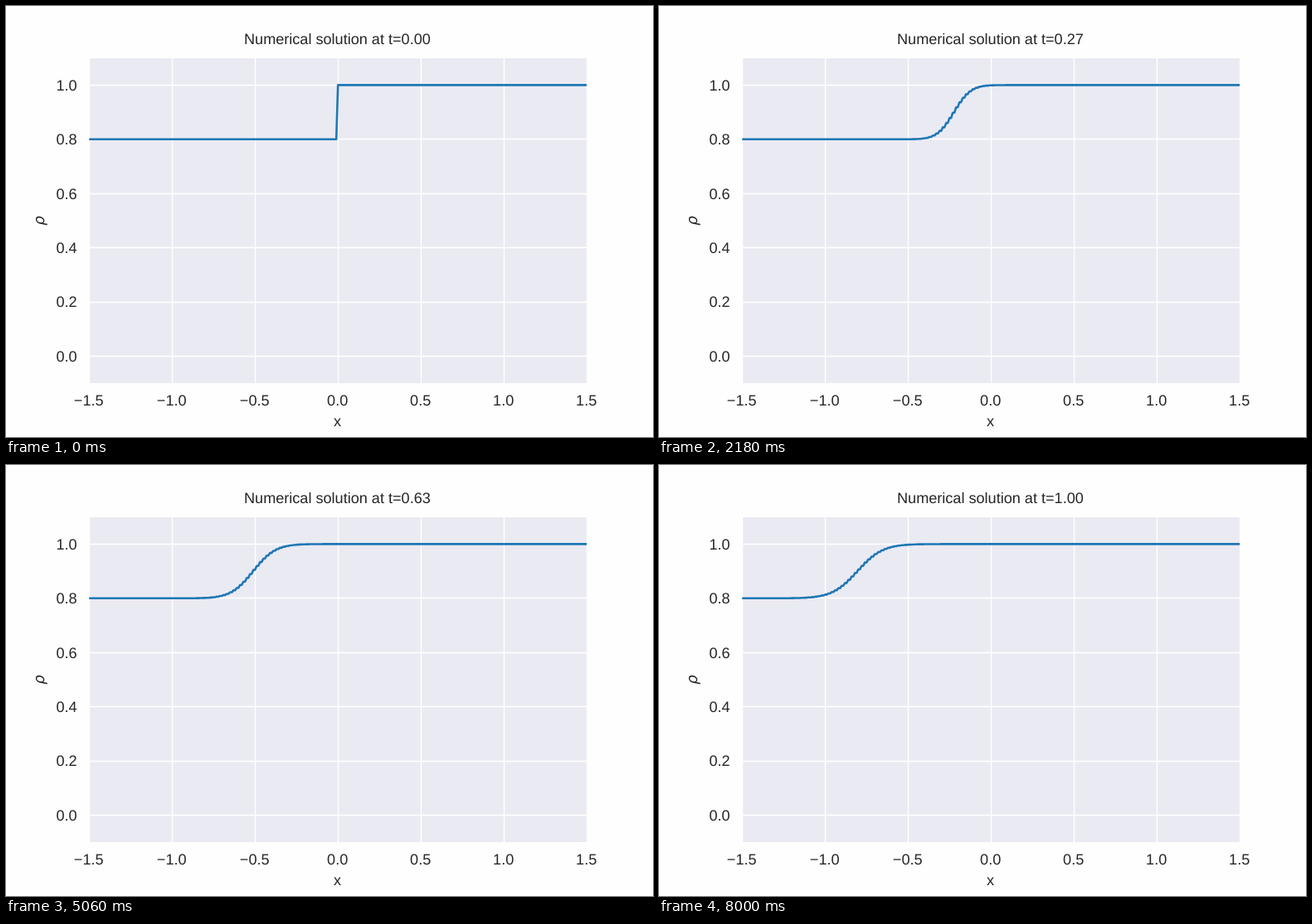
An HTML page that plays this animation: 780x520 px, repeating every 8020 ms.

```html
<!DOCTYPE html>
<html lang="en">
<head>
<meta charset="utf-8">
<title>Numerical solution</title>
<style>
  html, body { margin: 0; width: 100%; height: 100%; overflow: hidden; background: #fefefe; }
  svg { display: block; }
  text { font: 18.1px "Liberation Sans", Arial, sans-serif; fill: #262626; text-anchor: middle; text-rendering: geometricPrecision; }
  .end { text-anchor: end; }
  .rho { font: italic 18px "DejaVu Sans", sans-serif; }
  .grid { stroke: #fff; stroke-width: 1.4; }
  #curve { fill: none; stroke: #1f77b4; stroke-width: 2.6; stroke-linejoin: round; }
</style>
</head>
<body>
<svg width="780" height="520" viewBox="0 0 780 520">
  <clipPath id="area"><rect x="100" y="63" width="600.5" height="392"/></clipPath>
  <g clip-path="url(#area)">
    <rect x="100" y="63" width="600.5" height="392" fill="#eaeaf2"/>
    <g id="grid" class="grid"></g>
    <polyline id="curve"/>
  </g>
  <g id="labels"></g>
  <text id="title" x="399.4" y="46"></text>
  <text x="399.5" y="507">x</text>
  <text class="rho" transform="translate(46 259) rotate(-90)">ρ</text>
</svg>
<script>
const $ = id => document.getElementById(id);
const STEPS = 400, CELLS = 300, FRAME_MS = 20;
const DX = 0.01, DT = 1 / STEPS;
const px = x => 400.2 + 200 * x;
const py = y => 422.5 - 327.1 * y;
const snap = v => Math.floor(v) + 0.5;
const label = v => v.toFixed(1).replace('-', '−');

let grid = '', labels = '';
for (let i = -3; i <= 3; i++) {
  const x = px(i / 2);
  grid += `<path d="M${snap(x)} 60V460"/>`;
  labels += `<text x="${x - 0.5}" y="482">${label(i / 2)}</text>`;
}
for (let i = 0; i <= 5; i++) {
  const y = py(i / 5);
  grid += `<path d="M95 ${snap(y)}H705"/>`;
  labels += `<text class="end" x="85.7" y="${Math.round(y + 6.3)}">${label(i / 5)}</text>`;
}
$('grid').innerHTML = grid;
$('labels').innerHTML = labels;

// Lax-Friedrichs scheme for the traffic flow equation
const flux = u => u * (1 - u);
const advance = u => u.map((v, i) => {
  if (i === 0 || i === CELLS) return v;
  const a = u[i - 1], b = u[i + 1];
  return (a + b) / 2 - DT / (2 * DX) * (flux(b) - flux(a));
});

const states = [Array.from({ length: CELLS + 1 }, (_, i) => i < CELLS / 2 ? 0.8 : 1)];
for (let n = 0; n < STEPS; n++) states.push(advance(states[n]));

const start = performance.now();
function draw(now) {
  const n = Math.floor(Math.max(0, now - start) / FRAME_MS) % (STEPS + 1);
  $('title').textContent = `Numerical solution at t=${(n * DT).toFixed(2)}`;
  $('curve').setAttribute('points', states[n]
    .map((u, i) => `${px(i * DX - 1.5).toFixed(2)},${py(u).toFixed(2)}`).join(' '));
  requestAnimationFrame(draw);
}
draw(start);
</script>
</body>
</html>
```
